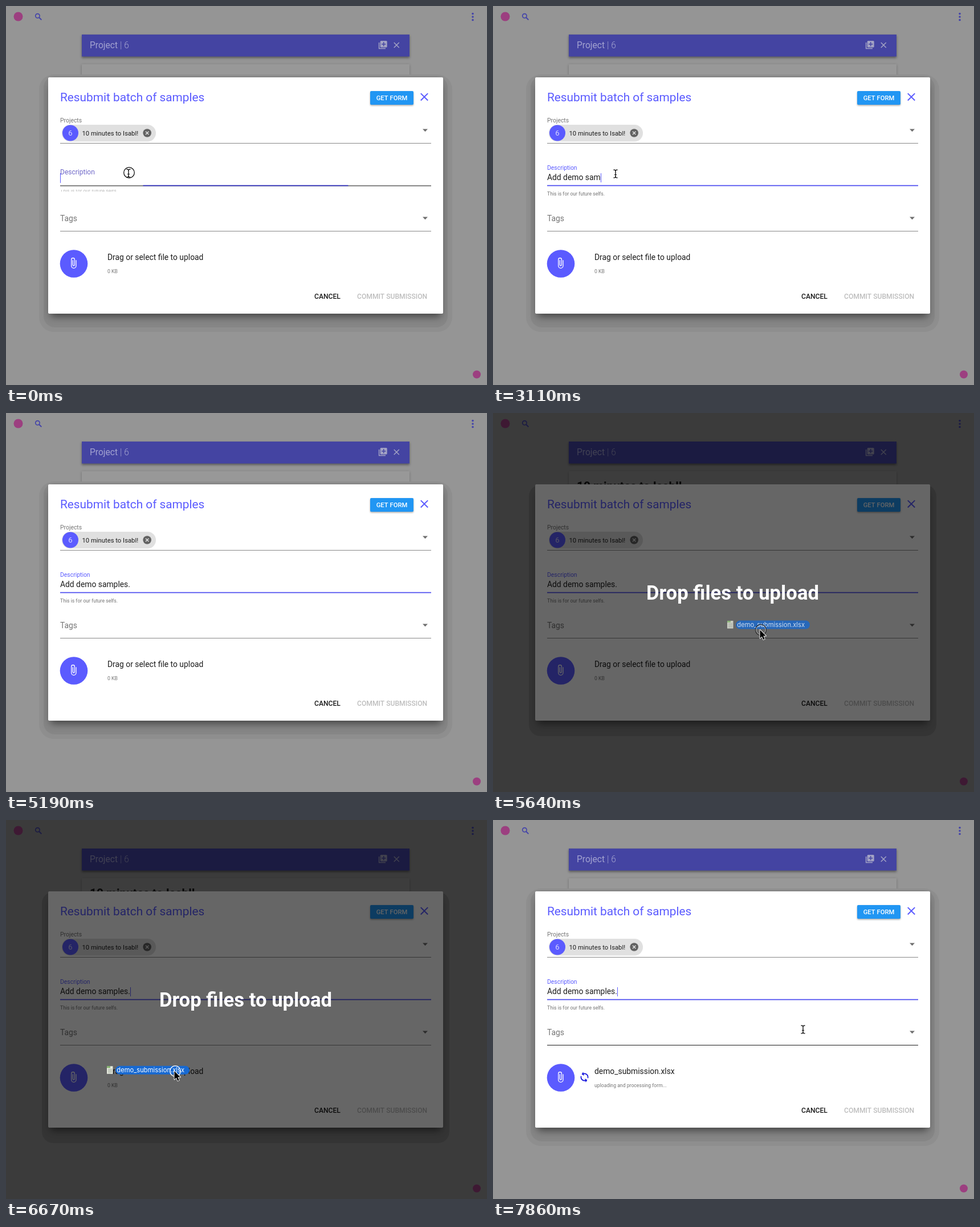
An HTML page with a canvas for the animation above (8000 ms loop, 844x664 px).

```html
<!DOCTYPE html>
<html lang="en">
<head>
<meta charset="utf-8">
<title>Resubmit batch of samples</title>
<style>
html, body { margin: 0; width: 100%; height: 100%; overflow: hidden; background: #959595; }
canvas { display: block; width: 844px; height: 664px; }
</style>
</head>
<body>
<canvas id="stage" width="844" height="664"></canvas>
<script>
const ctx = document.getElementById('stage').getContext('2d');
const LOOP = 8000, STEP = 148.5;
const PRIMARY = '#5b5bff';
const MESSAGE = 'Add demo samples.';
const FILE = 'demo_submission.xlsx';

// [time, number of characters typed]
const TYPING = [[730, 1], [1180, 2], [1330, 4], [1930, 5], [2080, 6], [2220, 7], [2370, 8], [2520, 9],
  [2820, 10], [2970, 11], [3110, 12], [3260, 13], [3410, 14], [3550, 16], [3700, 17]];
const CARET_TOGGLES = [4300, 4740, 5190, 5790, 6230, 6670, 7120, 7720];

const SYNC = new Path2D('M12 4V1L8 5l4 4V6c3.31 0 6 2.69 6 6 0 1.01-.25 1.97-.7 2.8l1.46 1.46C19.54 15.03 20 13.57 20 12c0-4.42-3.58-8-8-8z');
const CLIP = new Path2D('M17.25 6v11.5a4.75 4.75 0 0 1-9.5 0V5a3.25 3.25 0 0 1 6.5 0v10.5a1.75 1.75 0 0 1-3.5 0V6');
const ARROW = new Path2D('M0 0V14.5L3.4 11.4L5.8 17L8.2 16L5.8 10.5H10.4Z');
const HAND = new Path2D('M-2 3V-6q1.2-1.8 2.4 0V-1q1.2-1.2 2.3 0q1.2-1 2.2.3q1.4-.8 2 .6V4L5.5 8H-2L-6.5 2q.2-2 2-1Z');

const lerp = (a, b, p) => a + (b - a) * p;
const clamp = p => Math.max(0, Math.min(1, p));
const smooth = p => p * p * (3 - 2 * p);
const stepsSince = (t, start) => Math.floor((t - start + 4) / STEP);

function rect(x, y, w, h, color, radius = 0) {
  ctx.fillStyle = color;
  ctx.beginPath();
  ctx.roundRect(x, y, w, h, radius);
  ctx.fill();
}

function disc(x, y, r, color) {
  ctx.fillStyle = color;
  ctx.beginPath();
  ctx.arc(x, y, r, 0, Math.PI * 2);
  ctx.fill();
}

function text(str, x, y, size, color, weight = 400, align = 'left', family = 'Roboto') {
  ctx.font = `${weight} ${size}px ${family}, sans-serif`;
  ctx.textAlign = align;
  ctx.fillStyle = color;
  ctx.fillText(str, x, y);
}

function stroke(points, color, width) {
  ctx.strokeStyle = color;
  ctx.lineWidth = width;
  ctx.beginPath();
  points.forEach(([x, y], i) => i ? ctx.lineTo(x, y) : ctx.moveTo(x, y));
  ctx.stroke();
}

function cross(x, y, r, color, width) {
  stroke([[x - r, y - r], [x + r, y + r]], color, width);
  stroke([[x - r, y + r], [x + r, y - r]], color, width);
}

function at(x, y, draw) {
  ctx.save();
  ctx.translate(x, y);
  draw();
  ctx.restore();
}

function withShadow(color, blur, dy, draw) {
  ctx.save();
  ctx.shadowColor = color;
  ctx.shadowBlur = blur;
  ctx.shadowOffsetY = dy;
  draw();
  ctx.restore();
}

function dropArrow(y) {
  ctx.fillStyle = '#6f6f6f';
  ctx.beginPath();
  ctx.moveTo(731, y);
  ctx.lineTo(740, y);
  ctx.lineTo(735.5, y + 4.6);
  ctx.fill();
}

function ring(x, y, color) {
  ctx.strokeStyle = color;
  ctx.lineWidth = 1.3;
  ctx.beginPath();
  ctx.arc(x, y, 9.3, 0, Math.PI * 2);
  ctx.stroke();
}

function beam(x, y) {
  for (const [color, width] of [['#fff', 3], ['#111', 1.4]]) {
    stroke([[x, y - 6], [x, y + 6]], color, width);
    stroke([[x - 3.5, y - 7], [x - 1, y - 6.6], [x, y - 5.5], [x + 1, y - 6.6], [x + 3.5, y - 7]], color, width);
    stroke([[x - 3.5, y + 7], [x - 1, y + 6.6], [x, y + 5.5], [x + 1, y + 6.6], [x + 3.5, y + 7]], color, width);
  }
  stroke([[x - 2, y + 1.5], [x + 2, y + 1.5]], '#111', 1);
}

function outlined(path, x, y, fill, line) {
  at(x, y, () => {
    ctx.strokeStyle = line;
    ctx.lineWidth = 1.8;
    ctx.lineJoin = 'round';
    ctx.stroke(path);
    ctx.fillStyle = fill;
    ctx.fill(path);
  });
}

function drawPage(dropping) {
  rect(0, 0, 844, 664, '#959595');
  disc(21.5, 18.5, 8, '#9c3f80');
  disc(826, 645.5, 7, '#9c3f80');

  ctx.strokeStyle = '#4242aa';
  ctx.lineWidth = 1.6;
  ctx.beginPath();
  ctx.arc(55.4, 17.3, 3.7, 0, Math.PI * 2);
  ctx.stroke();
  stroke([[58, 20], [62.3, 24.3]], '#4242aa', 1.9);
  for (const y of [13.6, 19, 24.4]) disc(819, y, 1.75, '#4242aa');

  withShadow('rgba(0,0,0,.25)', 4, 1, () => rect(133, 102, 575, 40, '#989898'));
  withShadow('rgba(0,0,0,.4)', 4, 2, () => rect(133, 50, 575, 38.5, '#4444a2'));
  text('Project', 147, 73.5, 15.6, '#a3a3d0');
  text('| 6', 200, 73.5, 15.6, '#a3a3d0', 300);
  rect(656.7, 61, 12, 11.5, '#a3a3c4', 1.5);
  stroke([[654.6, 64], [654.6, 74.4], [666, 74.4]], '#a3a3c4', 1.5);
  stroke([[662.7, 63], [662.7, 70.5]], '#4444a2', 1.5);
  stroke([[659, 66.8], [666.4, 66.8]], '#4444a2', 1.5);
  cross(685.3, 68.5, 4.5, '#a3a3c4', 1.5);
  text('10 minutes to Isabl!', 147, 135, 20.8, '#141414', 700);

  if (dropping) {
    rect(63, 126, 715, 440, '#838383', 20);
  } else {
    rect(58, 120, 725, 451, '#8e8e8e', 26);
    rect(66, 123, 709, 440, '#868686', 20);
  }
  withShadow('rgba(0,0,0,.5)', 14, 7, () => rect(78, 132, 685, 405, '#777', 4));
}

function drawDescription(t) {
  const opening = t < 140 ? 0.53 : t < 290 ? 0.95 : 1;
  if (opening < 1) rect(95, 314.5, 651, 1, '#111');
  const half = 325.5 * (opening < 0.9 ? 0.553 : opening);
  rect(420.5 - half, 313.8, half * 2, 1.8, opening < 0.9 ? '#3d3dc8' : '#5050f0');

  text('Description', 95, lerp(305, 287, opening), lerp(13.87, 10.4, opening),
    opening < 0.9 ? '#6f68c8' : PRIMARY);

  ctx.save();
  if (opening < 0.9) {
    ctx.beginPath();
    ctx.rect(95, 322, 110, 3.2);
    ctx.clip();
    ctx.globalAlpha = 0.5;
  }
  text('This is for our future selfs.', 95, lerp(321, 332, opening < 0.9 ? 0.5 : opening), 8.67, '#757575');
  ctx.restore();

  const typed = TYPING.reduce((n, [time, count]) => t >= time ? count : n, 0);
  const value = MESSAGE.slice(0, typed);
  text(value, 95, 305, 13.87, '#1c1c1c');
  const caretOn = CARET_TOGGLES.filter(time => t >= time).length % 2 === 0;
  if (caretOn) rect(Math.round(95 + ctx.measureText(value).width), 293, 1, opening < 0.9 ? 17 : 16, PRIMARY);
}

function drawUpload(t) {
  disc(119, 451.5, 24.3, PRIMARY);
  at(108, 440, () => {
    ctx.scale(0.87, 0.87);
    ctx.strokeStyle = '#fff';
    ctx.lineWidth = 1.5;
    ctx.stroke(CLIP);
  });

  if (t < 6820) {
    text('Drag or select file to upload', 178, 444.8, 13.87, '#1c1c1c');
    text('0 KB', 178, 467.6, 8.67, '#757575');
    return;
  }

  text(FILE, 178, 444.8, 13.87, '#1c1c1c');
  if (t < 6970) {
    text('0 KB', 178, 459.5, 8.67, '#d0d0d0');
    text('86.93 KB', 178, 463.2, 8.67, '#999');
  } else {
    text(t < 7270 ? '86.93 KB' : 'uploading and processing form...', 178, 467.6, 8.67, '#757575');
  }

  at(160.5, 450.5, () => {
    ctx.rotate(-stepsSince(t, 6820) * STEP / 1000 * Math.PI * 2);
    ctx.scale(0.867, 0.867);
    ctx.fillStyle = '#1414dc';
    for (let i = 0; i < 2; i++) {
      at(-12, -12, () => ctx.fill(SYNC));
      ctx.rotate(Math.PI);
    }
  });
}

function drawDialog(t, tagsHovered) {
  rect(74, 125, 693, 414, '#fff', 2);
  text('Resubmit batch of samples', 95, 166.8, 20.8, PRIMARY);
  withShadow('rgba(0,0,0,.35)', 3, 1.5, () => rect(639, 149, 76, 24, '#2196f3', 2));
  text('GET FORM', 677, 165, 11.27, '#fff', 500, 'center');
  cross(734, 159.3, 6.2, PRIMARY, 2);

  text('Projects', 95, 204.3, 10.4, '#757575');
  rect(98, 208, 165, 29.5, '#e0e0e0', 15);
  disc(113, 222.5, 14, PRIMARY);
  text('6', 113, 227, 13, '#d8d8ff', 400, 'center');
  text('10 minutes to Isabl!', 133.5, 226.6, 11.27, '#1c1c1c');
  disc(247.7, 222.5, 7.3, '#626262');
  cross(247.7, 222.5, 2.7, '#e0e0e0', 1.5);
  dropArrow(215.6);
  rect(95, 240, 651, 1, '#888');

  drawDescription(t);

  text('Tags', 95, 376.6, 13.87, '#757575');
  dropArrow(369.6);
  rect(95, 394, 651, 1, tagsHovered ? '#1c1c1c' : '#888');

  drawUpload(t);
  text('CANCEL', 541, 513.2, 12.13, '#1c1c1c', 500);
  text('COMMIT SUBMISSION', 616, 513.2, 12.13, '#bdbdbd', 500);
}

function drawDrag(t) {
  const p = smooth(clamp(stepsSince(t, 5640) / 5));
  const x = lerp(470, 297, p), y = lerp(380, 440, p);
  const tagX = lerp(426, 192, p), tagY = lerp(371, 438.3, p);

  ctx.globalAlpha = lerp(0.78, 1, clamp(p * 2));
  rect(tagX - 15, tagY - 7, 10.5, 13.5, '#e4e8dc');
  rect(tagX - 15, tagY - 7, 6, 3, '#7fb069');
  for (let i = 0; i < 3; i++) rect(tagX - 13, tagY - 2 + i * 2.5, 7, 1, '#9aa396');
  rect(tagX, tagY - 7.5, 130, 15, '#1769d2', 7.5);
  text(FILE, tagX + 2.3, tagY + 4, 11.2, '#fff', 400, 'left', 'Inter');
  ctx.globalAlpha = 1;

  ring(x, y, p < 0.5 ? '#151515' : '#fff');
  if (p < 0.5) {
    ctx.strokeStyle = 'rgba(255,255,255,.75)';
    ctx.lineWidth = 0.8;
    ctx.beginPath();
    ctx.arc(x, y, 8.4, 0, Math.PI * 2);
    ctx.stroke();
  }
  outlined(ARROW, x - 1.5, y, '#000', '#fff');
}

function draw(t) {
  const dropping = t >= 5640 && t < 6820;
  const move = smooth(clamp(stepsSince(t, 6820) / 6));
  const pointer = [lerp(300.5, 544, move), lerp(448, 367, move)];
  const tagsHovered = t >= 6820 && pointer[1] < 400;

  drawPage(dropping);
  drawDialog(t, tagsHovered);

  if (dropping) {
    rect(0, 0, 844, 664, 'rgba(0,0,0,.6)');
    text('Drop files to upload', 420.5, 327, 34.67, '#fff', 700, 'center');
    drawDrag(t);
  } else if (t < 4300) {
    beam(215, t < 140 ? 293 : 294);
    if (t < 290) ring(216, 292, '#111');
  } else if (t < 4440) {
    beam(367, 312);
  } else if (tagsHovered) {
    beam(...pointer);
  } else if (t >= 6820) {
    outlined(HAND, ...pointer, '#fff', '#111');
  }
}

const start = performance.now();
function frame() {
  draw((performance.now() - start) % LOOP);
  requestAnimationFrame(frame);
}
frame();
</script>
</body>
</html>
```
